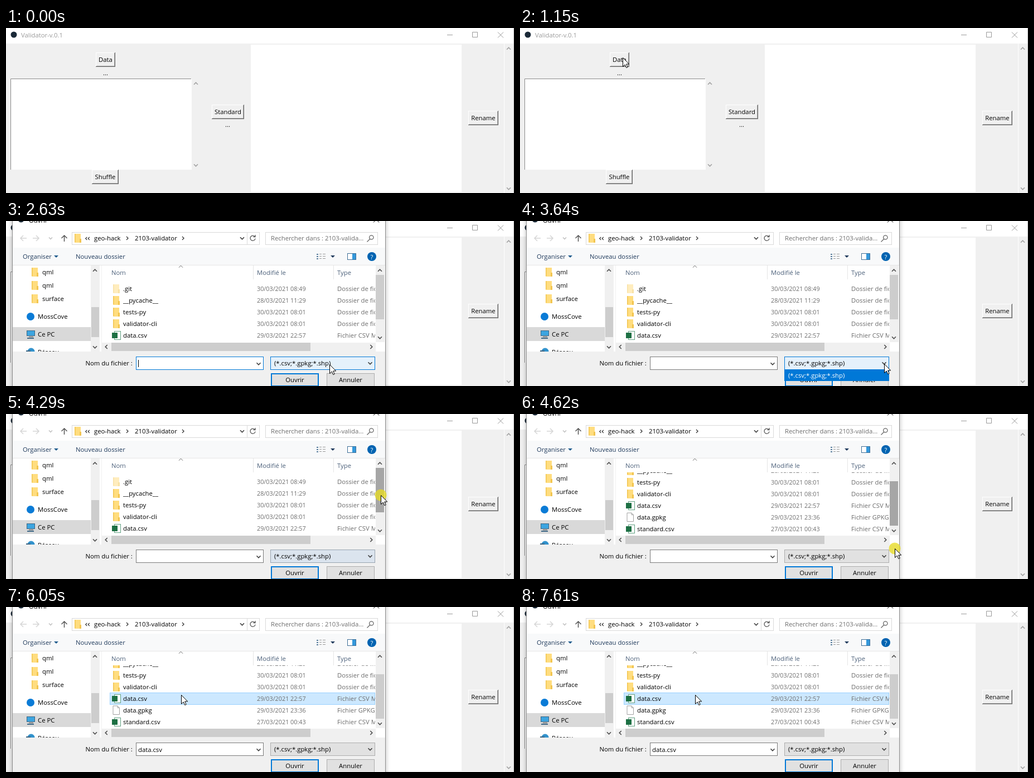
Write an HTML page that moves like this. It is 911 by 297 pixels and loops after 8 s.

```html
<!DOCTYPE html>
<html lang="fr">
<head>
<meta charset="utf-8">
<title>Validator</title>
<style>
  html, body { margin: 0; width: 100%; height: 100%; overflow: hidden; background: #f0f0f0; }
  svg { display: block; width: 911px; height: 297px; }
  rect { shape-rendering: crispEdges; }
  text { font: 11.3px "Open Sans", "Noto Sans", sans-serif; font-variant-ligatures: none; white-space: pre; }
  .date { font-size: 10.8px; }
  .mid { text-anchor: middle; }
</style>
</head>
<body>
<svg id="stage" viewBox="0 0 911 297"></svg>
<script>
const LOOP = 8000;
const BLUE = '#0078d7', GREY = '#f0f0f0', THUMB = '#cdcdcd', MUTED = '#6d6d6d';

const rect = (x, y, w, h, fill, extra = '') =>
  `<rect x="${x}" y="${y}" width="${w}" height="${h}" fill="${fill}" ${extra}/>`;
const box = (x, y, w, h, fill, stroke, extra = '') =>
  rect(x + .5, y + .5, w - 1, h - 1, fill, `stroke="${stroke}" ${extra}`);
const text = (x, y, s, fill = '#000', extra = '') =>
  `<text x="${x}" y="${y}" fill="${fill}" ${extra}>${s}</text>`;
const stroke = (d, color, width = 1, extra = '') =>
  `<path d="${d}" fill="none" stroke="${color}" stroke-width="${width}" ${extra}/>`;
const shape = (d, fill) => `<path d="${d}" fill="${fill}"/>`;
const dot = (x, y, r, fill, extra = '') => `<circle cx="${x}" cy="${y}" r="${r}" fill="${fill}" ${extra}/>`;
const group = (id, content, extra = '') => `<g id="${id}" ${extra}>${content}</g>`;

// Chevron centred on x, y pointing up, down, left or right.
const chevron = (x, y, dir, color = '#505050', size = 3.5, width = 1.7) => {
  const angle = { down: 0, left: 90, up: 180, right: 270 }[dir];
  return stroke(`M${-size} ${-size / 2}L0 ${size / 2}L${size} ${-size / 2}`, color, width,
    `transform="translate(${x} ${y}) rotate(${angle})"`);
};
const triangle = (x, y, color) => shape(`M${x - 4} ${y - 2}h8l-4 4z`, color);
const folder = (x, y, extra = '') => `<g ${extra}>` +
  shape(`M${x} ${y - 8}h11v9h1v7h-12z`, '#ffdd7f') +
  shape(`M${x} ${y - 8}h1.5v15h-1.5zM${x + 9} ${y + 1}h3v7h-3z`, '#f2c550') + '</g>';
const page = (x, y) => stroke(`M${x} ${y - 8}h8l3.5 3.5v12h-11.5zM${x + 8} ${y - 8}v3.5h3.5`, '#a0a0a0', 1);
const sheet = y => box(194, y - 8, 12, 16, '#fff', '#5f9f80') + rect(190, y - 5, 10, 10, '#1d7044');

const tkButton = (x, y, w, h, label) =>
  rect(x, y, w, h, '#696969') + rect(x, y, w - 1, h - 1, '#fff') +
  rect(x + 1, y + 1, w - 2, h - 2, '#a0a0a0') + rect(x + 1, y + 1, w - 3, h - 3, GREY) +
  text(x + w / 2, y + 17, label, '#000', 'class="mid"');

function mainWindow() {
  return rect(0, 0, 911, 297, GREY) + rect(0, 0, 911, 28, '#fff') +
    dot(14, 12, 5.5, '#1b2a38') +
    group('caption', text(27, 17, 'Validator-v.0.1', 'currentColor') +
      stroke('M791 12.5h10M836.5 7.5h9v9h-9zM882 7.5l10 10m0-10l-10 10', 'currentColor')) +
    tkButton(161, 44, 35, 26, 'Data') + text(178.5, 85, '...', '#000', 'class="mid"') +
    rect(8, 91, 325, 164, '#fff') + stroke('M8.5 255V91.5H332', '#8a8a8a') +
    chevron(340.5, 100, 'up', '#a3a3a3') + chevron(340.5, 247, 'down', '#a3a3a3') +
    tkButton(154, 255, 48, 26, 'Shuffle') +
    tkButton(369, 138, 58, 26, 'Standard') + text(397.5, 178, '...', '#000', 'class="mid"') +
    rect(439, 30, 378, 265, '#fff') +
    tkButton(829, 149, 54, 26, 'Rename') +
    rect(893, 28, 1, 269, '#fff') + rect(910, 0, 1, 297, '#bdbdbd') +
    chevron(901.5, 37, 'up', '#a3a3a3') + chevron(901.5, 289, 'down', '#a3a3a3');
}

function topBars() {
  const viewRows = [59, 63, 67].map(y =>
    rect(557, y, 3, 2, '#5b7f9e') + rect(562, y, 4, 1, '#999') + rect(568, y, 5, 1, '#999')).join('');
  return dot(27, -3, 5.5, '#1b2a38') + text(41, 3, 'Ouvrir') + stroke('M659 2.5l10-10m0 10l-10-10', '#000') +
    // navigation
    stroke('M37 31H26m5-5l-5 5 5 5', '#d6d6d6', 1.5) + stroke('M48 31h11m-5-5l5 5-5 5', '#d6d6d6', 1.5) +
    chevron(80, 31, 'down', '#c4c4c4', 3) + stroke('M104.5 37V26m-5 5l5-5 5 5', '#555', 1.5) +
    box(118, 20, 337, 23, '#fff', '#d9d9d9') + rect(432, 21, 1, 21, '#d9d9d9') + folder(123, 31) +
    chevron(144, 31.5, 'left', '#222', 2.6, 1.1) + chevron(148.5, 31.5, 'left', '#222', 2.6, 1.1) +
    text(158, 35, 'geo-hack') + chevron(217.5, 31, 'right', '#333', 3, 1.3) +
    text(231, 35, '2103-validator') + chevron(317.5, 31, 'right', '#333', 3, 1.3) +
    chevron(423.5, 31, 'down', '#444') + stroke('M446 28a4.5 4.5 0 1 0 1 3.5M447 25v3.5h-3.5', '#555', 1.3) +
    box(465, 20, 202, 23, '#fff', '#d9d9d9') + text(475, 35, 'Rechercher dans : 2103-valida...', MUTED) +
    stroke('M652.5 32.5l-5 5M659 29.5a3.7 3.7 0 1 1-7.4 0 3.7 3.7 0 1 1 7.4 0', '#666', 1.3) +
    // toolbar
    rect(12, 48, 668, 32, '#f8f9fa') + rect(12, 79, 668, 1, '#e6e6e6') +
    group('newHover', box(110, 51, 118, 26, '#d8eaf9', '#92c6e8')) +
    text(30, 68, 'Organiser', '#1e395b') + triangle(90, 64, '#1e5a8c') + text(125, 68, 'Nouveau dossier', '#1e395b') +
    viewRows + triangle(586, 64, '#1e395b') +
    box(612, 58, 16, 12, '#fff', '#3b6d96') + rect(621, 59, 6, 10, '#3498db') +
    dot(656, 64, 8, '#0063b1') + text(656, 68.5, '?', '#fff', 'class="mid" font-weight="700"');
}

function navPane() {
  const folders = ['qml', 'qml', 'surface'].map((name, i) =>
    folder(46, 92 + 24 * i) + text(65, 96 + 24 * i, name)).join('');
  return rect(12, 80, 668, 155, '#fff') + folders +
    dot(44, 172, 7, '#0a7bd6') + text(57, 176, 'MossCove') +
    rect(12, 191, 140, 25, '#d9d9d9') +
    box(37, 197, 15, 10, '#3da5e0', '#3d6684') + rect(41, 208, 8, 1, '#555') + rect(38, 210, 12, 2, '#3d6684') +
    text(57, 208, 'Ce PC') +
    `<g clip-path="url(#navClip)">${dot(45, 235, 6.5, '#3292cc')}${rect(36, 233, 8, 6, '#3d6684')}${text(57, 240, 'Réseau')}</g>` +
    rect(152, 80, 16, 155, GREY) + chevron(159.5, 89, 'up') + chevron(159.5, 227, 'down') +
    rect(153, 155, 14, 54, THUMB) + rect(171, 80, 1, 155, GREY);
}

const FILES = [
  ['.git', '30/03/2021 08:49', 'Dossier de fichiers'],
  ['__pycache__', '28/03/2021 11:29', 'Dossier de fichiers'],
  ['tests-py', '30/03/2021 08:01', 'Dossier de fichiers'],
  ['validator-cli', '30/03/2021 08:01', 'Dossier de fichiers'],
  ['data.csv', '29/03/2021 22:57', 'Fichier CSV M'],
  ['data.gpkg', '29/03/2021 23:36', 'Fichier GPKG'],
  ['standard.csv', '27/03/2021 00:43', 'Fichier CSV M'],
];
const ROW = 21, LIST_TOP = 111, SCROLL = 41;

function fileList() {
  const rows = FILES.map(([name, date, type], i) => {
    const y = 122 + ROW * i;
    const icon = i < 4 ? folder(192, y, i ? '' : 'opacity=".5"') : name.endsWith('csv') ? sheet(y) : page(192, y);
    return icon + text(210, y + 4, name) + text(450, y + 4, date, MUTED, 'class="date"') + text(594, y + 4, type, MUTED);
  }).join('');
  return `<g clip-path="url(#listClip)">${group('rows', box(186, 0, 476, ROW + 1, '#fff', '#fff', 'id="rowMark"') + rows)}</g>` +
    chevron(313.5, 82, 'up', '#666', 3.5, 1) +
    ['Nom', 'Modifié le', 'Type'].map((s, i) => text([189, 450, 594][i], 97, s, '#4c607a')).join('') +
    rect(443, 80, 1, 25, '#e5e5e5') + rect(587, 80, 1, 25, '#e5e5e5') +
    rect(663, 80, 16, 138, GREY) + chevron(670.5, 89, 'up') + chevron(670.5, 210, 'down') +
    rect(663, 97, 15, 80, THUMB, 'id="thumb"') +
    rect(172, 219, 491, 16, GREY) + chevron(180, 226.5, 'left') + chevron(655, 226.5, 'right') +
    rect(189, 219, 357, 15, THUMB);
}

function bottomBar() {
  return rect(12, 235, 668, 62, GREY) + text(142.5, 260, 'Nom du fichier :') +
    box(233, 244, 229, 24, '#fff', BLUE, 'id="field"') + chevron(453, 257, 'down', '#444') +
    rect(237, 250, 1, 13, '#000', 'id="caret"') + text(237, 261, 'data.csv', '#000', 'id="fileName"') +
    box(474, 244, 188, 24, '#e1e1e1', '#adadad', 'id="combo"') +
    text(481, 260, '(*.csv;*.gpkg;*.shp)') + chevron(653, 256, 'down', '#444') +
    rect(476, 275, 84, 22, '#e1e1e1', `stroke="${BLUE}" stroke-width="2"`) + text(518, 290, 'Ouvrir', '#000', 'class="mid"') +
    box(575, 274, 86, 24, '#e1e1e1', '#adadad') + text(618, 290, 'Annuler', '#000', 'class="mid"') +
    group('dropdown', box(474, 268, 188, 20, '#fff', BLUE) + rect(475, 269, 186, 18, BLUE) +
      text(481, 282, '(*.csv;*.gpkg;*.shp)', '#fff'));
}

document.getElementById('stage').innerHTML =
  `<defs>
    <clipPath id="navClip"><rect x="12" y="80" width="140" height="155"/></clipPath>
    <clipPath id="listClip"><rect x="172" y="105" width="490" height="113"/></clipPath>
  </defs>` + mainWindow() +
  group('dialog', box(11, -20, 670, 340, '#fff', '#8c8c8c', 'style="filter:drop-shadow(0 0 4px #0004)"') +
    topBars() + navPane() + fileList() + bottomBar()) +
  dot(0, 0, 10.5, '#e8dc1e', 'id="click" opacity=".75"') +
  group('cursor', '<path d="M.5 .5V16.5L4.2 13 6.8 18.6 9.2 17.5 6.7 12H11.7Z" fill="#fff" stroke="#000"/>');

const el = {};
for (const node of document.querySelectorAll('[id]')) el[node.id] = node;
const show = (node, on) => node.style.display = on ? '' : 'none';
const paint = (node, fill, line) => { node.style.fill = fill; node.style.stroke = line; };
const within = (v, a, b) => v >= a && v < b;

// Pointer moves: start ms, end ms, number of steps, destination.
const MOVES = [
  [230, 590, 5, 190, 38], [810, 810, 1, 184, 53], [1820, 2510, 7, 578, 258], [2630, 2630, 1, 580, 258],
  [3060, 3400, 4, 653, 257], [3960, 4290, 4, 672, 146], [4410, 4620, 3, 672, 242],
  [4840, 5270, 5, 336, 157], [5390, 5500, 2, 314, 158],
];

function pointerAt(t) {
  let x = 459, y = 132;
  for (const [start, end, steps, toX, toY] of MOVES) {
    if (t < start) break;
    const progress = end > start ? Math.min(1, (t - start) / (end - start)) : 1;
    const k = (Math.floor(progress * (steps - 1) + .05) + 1) / steps;
    x += (toX - x) * k;
    y += (toY - y) * k;
  }
  return [x, y];
}

function render(t) {
  const [x, y] = pointerAt(t);
  const scroll = t < 4410 ? 0 : t < 4510 ? ROW : SCROLL;
  const inList = t >= 1360 && within(x, 186, 662) && within(y, 105, 217);
  const selected = t >= 6050;
  const hovered = Math.floor((y + scroll - LIST_TOP) / ROW);

  el.cursor.setAttribute('transform', `translate(${x} ${y})`);
  show(el.cursor, t >= 230);
  el.click.setAttribute('transform', `translate(${x} ${y})`);
  show(el.click, within(t, 810, 920) || within(t, 3400, 3520) || within(t, 3740, 3860) || within(t, 4290, 4840));
  el.caption.style.color = within(t, 810, 1060) ? '#000' : '#999';

  show(el.dialog, t >= 1360);
  el.dialog.style.opacity = t < 1470 ? .5 : 1;
  show(el.newHover, within(x, 110, 228) && within(y, 51, 77));

  el.rows.setAttribute('transform', `translate(0 ${-scroll})`);
  show(el.rowMark, selected || inList && within(hovered, 0, FILES.length));
  el.rowMark.setAttribute('y', LIST_TOP + ROW * (selected ? 4 : hovered) + .5);
  paint(el.rowMark, selected ? '#cce8ff' : '#e5f3ff', selected ? '#99d1ff' : '#e5f3ff');
  el.thumb.setAttribute('y', 97 + Math.round(24 * scroll / SCROLL));
  el.thumb.style.fill = within(t, 4180, 5390) ? '#a6a6a6' : THUMB;

  const comboHot = within(x, 474, 662) && within(y, 244, 268);
  if (comboHot) paint(el.combo, '#e5f1fb', BLUE);
  else if (within(t, 3960, 4410)) paint(el.combo, '#dbe4ee', '#98a4b0');
  else paint(el.combo, '#e1e1e1', '#adadad');
  show(el.dropdown, within(t, 3400, 3740));
  el.field.style.stroke = t < 3400 ? BLUE : '#7a7a7a';
  show(el.caret, t < 3400);
  show(el.fileName, selected);
}

const begin = performance.now();
function tick() {
  render((performance.now() - begin) % LOOP);
  requestAnimationFrame(tick);
}
tick();
</script>
</body>
</html>
```
